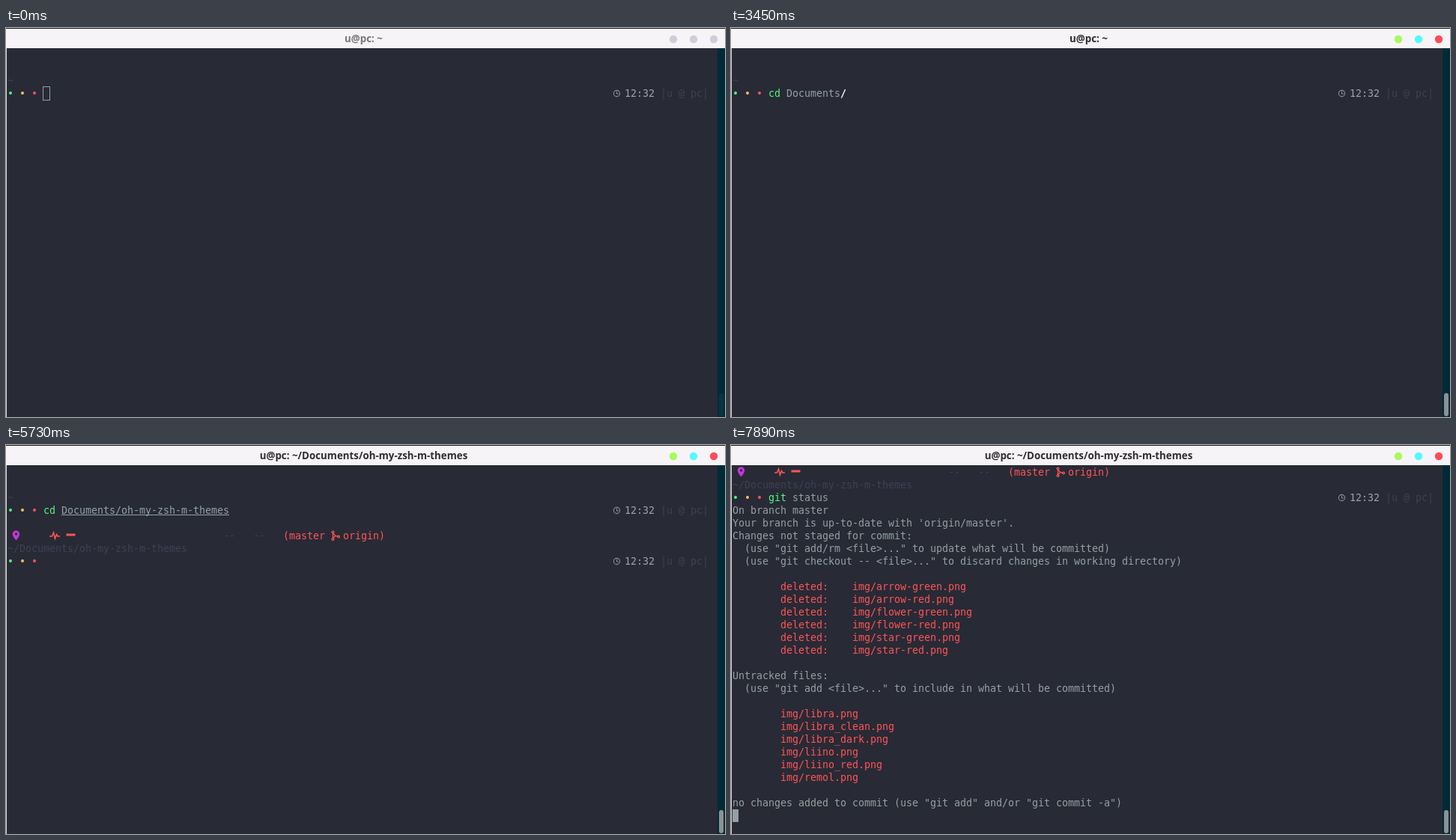
Recreate the animation shown at these times as an HTML page with a canvas. Size 960x520 px, loop 8 s.

```html
<!DOCTYPE html>
<html>
<head>
<meta charset="utf-8">
<style>
html, body { margin: 0; width: 100%; height: 100%; overflow: hidden; background: #282a36; }
canvas { display: block; width: 960px; height: 520px; }
</style>
</head>
<body>
<canvas id="stage" width="960" height="520"></canvas>
<script>
const ctx = document.getElementById('stage').getContext('2d', { alpha: false });
const LOOP = 8000, CELL = 8, LINE = 17, LEFT = 2, TOP = 28;
const MONO = '13.333px "DejaVu Sans Mono", monospace';
const BG = '#282a36', GREY = '#93a1a1', DIM = '#3f4155';
const GREEN = '#50fa7b', ORANGE = '#ffb86c', RED = '#ff5555', WHITE = '#ffffff';
const USER = 'u', HOST = 'pc';
const DIR = 'Documents/oh-my-zsh-m-themes';

// [time, typed text, text colour]
const CD = [
  [0, ''], [1890, 'c', RED], [1970, 'cd'], [2050, 'cd '],
  [2260, 'cd d'], [2390, 'cd do'], [2570, 'cd doc'],
  [2870, 'cd Documents/'], [3700, 'cd ' + DIR + '/'], [5180, 'cd ' + DIR]
];
const GIT = [
  [0, ''], [6540, 'g', RED], [6640, 'gi', RED], [6740, 'git'], [6980, 'git '],
  [7130, 'git s'], [7240, 'git st'], [7350, 'git sta'],
  [7460, 'git stat'], [7580, 'git statu'], [7690, 'git status']
];
const CURSOR_OFF = [[990, 1590], [3450, 3700], [4260, 4860], [5730, 6330]];

const STATUS = `On branch master
Your branch is up-to-date with 'origin/master'.
Changes not staged for commit:
  (use "git add/rm <file>..." to update what will be committed)
  (use "git checkout -- <file>..." to discard changes in working directory)

        deleted:    img/arrow-green.png
        deleted:    img/arrow-red.png
        deleted:    img/flower-green.png
        deleted:    img/flower-red.png
        deleted:    img/star-green.png
        deleted:    img/star-red.png

Untracked files:
  (use "git add <file>..." to include in what will be committed)

        img/libra.png
        img/libra_clean.png
        img/libra_dark.png
        img/liino.png
        img/liino_red.png
        img/remol.png

no changes added to commit (use "git add" and/or "git commit -a")`.split('\n');

const colX = col => LEFT + col * CELL;
const rowY = row => TOP + row * LINE;
const latest = (steps, t) => steps.filter(s => s[0] <= t).pop();

function rect(x, y, w, h, color) {
  ctx.fillStyle = color;
  ctx.fillRect(x, y, w, h);
}

function disc(x, y, r, color) {
  ctx.fillStyle = color;
  ctx.beginPath();
  ctx.arc(x, y, r, 0, Math.PI * 2);
  ctx.fill();
}

function stroke(points, color, width) {
  ctx.strokeStyle = color;
  ctx.lineWidth = width;
  ctx.beginPath();
  points.forEach(([x, y]) => ctx.lineTo(x, y));
  ctx.stroke();
}

function print(text, col, row, color, { bold = false, underline = false } = {}) {
  ctx.font = (bold ? 'bold ' : '') + MONO;
  ctx.textAlign = 'left';
  ctx.fillStyle = color;
  [...text].forEach((ch, i) => ctx.fillText(ch, colX(col + i), rowY(row) + 13));
  if (underline) rect(colX(col), rowY(row) + 14, text.length * CELL, 1, color);
}

function cursor(col, row, hollow) {
  const x = colX(col), y = rowY(row);
  if (!hollow) return rect(x, y, CELL, LINE, GREY);
  ctx.strokeStyle = GREY;
  ctx.lineWidth = 1;
  ctx.strokeRect(x - 0.5, y - 0.5, CELL + 1, LINE + 1);
}

function clock(row) {
  const y = rowY(row) + 8.5;
  ctx.strokeStyle = '#8a8f98';
  ctx.lineWidth = 1.1;
  ctx.beginPath();
  ctx.arc(815.5, y, 4.1, 0, Math.PI * 2);
  ctx.stroke();
  stroke([[815.5, y - 2.8], [815.5, y + 0.5], [818, y + 0.5]], '#8a8f98', 1);
}

function prompt(row) {
  [GREEN, ORANGE, RED].forEach((c, i) => print('•', i * 2, row, c));
  clock(row);
  print('12:32', 103, row, '#a1a4a5');
  print(`|${USER} @ ${HOST}|`, 109, row, DIM);
}

function pin(y) {
  const fill = ctx.createLinearGradient(8, 0, 19, 0);
  fill.addColorStop(0, '#e32ee0');
  fill.addColorStop(1, '#a43ce0');
  ctx.fillStyle = fill;
  ctx.beginPath();
  ctx.arc(13.5, y + 6, 4.7, Math.PI * 0.9, Math.PI * 2.1);
  ctx.quadraticCurveTo(17, y + 10.5, 13.5, y + 14.5);
  ctx.quadraticCurveTo(10, y + 10.5, 9, y + 7.4);
  ctx.fill();
  disc(13.5, y + 6, 1.8, BG);
}

function branch(y) {
  stroke([[436.5, y + 3], [436.5, y + 14]], RED, 1.3);
  stroke([[436.5, y + 5], [440, y + 8.5], [444, y + 9.5]], RED, 1.3);
  stroke([[436.5, y + 11.5], [440, y + 8.5]], RED, 1.3);
  [[436.5, 3.5], [436.5, 13], [444, 9.5]].forEach(([x, dy]) => {
    disc(x, y + dy, 2, RED);
    disc(x, y + dy, 0.7, BG);
  });
}

function repoLine(row) {
  const y = rowY(row);
  pin(y);
  stroke([[58, y + 9], [61.5, y + 9], [63.5, y + 4], [65.5, y + 12],
    [67.5, y + 6.5], [69, y + 9], [72, y + 9]], RED, 1.6);
  rect(80.5, y + 5.5, 12, 3, RED);
  print('--', 36, row, DIM);
  print('--', 41, row, DIM);
  print('(master', 46, row, RED);
  branch(y);
  print('origin)', 56, row, RED);
  print('~/' + DIR, 0, row + 1, DIM);
}

// Command word first, then its argument, with shell highlighting.
function command([, text, color = GREEN], row, done) {
  const [word, arg = ''] = text.split(' ');
  const col = 6 + word.length + 1;
  print(word, 6, row, color);
  if (/^do?c?$/.test(arg)) {
    print(arg, col, row, arg === 'd' ? ORANGE : GREY, { underline: arg === 'd' });
  } else if (arg.endsWith('/')) {
    print(arg.slice(0, -1), col, row, GREY);
    print('/', col + arg.length - 1, row, WHITE, { bold: true });
  } else {
    print(arg, col, row, GREY, { underline: done });
  }
}

function windowFrame(t) {
  const focused = t >= 450;
  rect(0, 0, 960, 27, '#f6f4f7');
  rect(0, 0, 960, 1, '#17171c');
  rect(0, 27, 1, 493, '#dcdce0');
  rect(950, 27, 10, 493, '#002b36');
  const title = `${USER}@${HOST}: ~` + (t >= 5260 ? '/' + DIR : '');
  ctx.font = 'bold 13.333px "Noto Sans", sans-serif';
  ctx.textAlign = 'center';
  ctx.fillStyle = focused ? '#2f2f33' : '#77777b';
  ctx.fillText(title, 477.5, 19);
  ['#a6fb5c', '#54f8ff', '#ff4a58'].forEach((c, i) =>
    disc(891 + i * 27, 15, 5.2, focused ? c : '#cdced8'));
  ctx.fillStyle = t >= 400 ? '#8b9296' : '#0a3440';
  ctx.beginPath();
  ctx.roundRect(952, 488, 6, 31, 3);
  ctx.fill();
}

function draw(t) {
  rect(0, 0, 960, 520, BG);
  windowFrame(t);
  const cd = latest(CD, t), git = latest(GIT, t);
  const visible = !CURSOR_OFF.some(([a, b]) => t >= a && t < b);

  if (t >= 7890) {
    repoLine(0);
    prompt(2);
    command(git, 2);
    STATUS.forEach((line, i) =>
      print(line, 0, i + 3, line.startsWith('        ') ? RED : GREY));
    cursor(0, 27);
    return;
  }

  print('~', 0, 2, DIM);
  prompt(3);
  command(cd, 3, t >= 5180);
  if (t < 5180) {
    if (visible) cursor(6 + cd[1].length, 3, t < 400);
  } else if (t < 5260) {
    cursor(0, 4);
  } else {
    repoLine(5);
    prompt(7);
    command(git, 7);
    if (visible) cursor(6 + git[1].length, 7);
  }
}

function tick(now) {
  draw(now % LOOP);
  requestAnimationFrame(tick);
}
draw(0);
requestAnimationFrame(tick);
</script>
</body>
</html>
```
